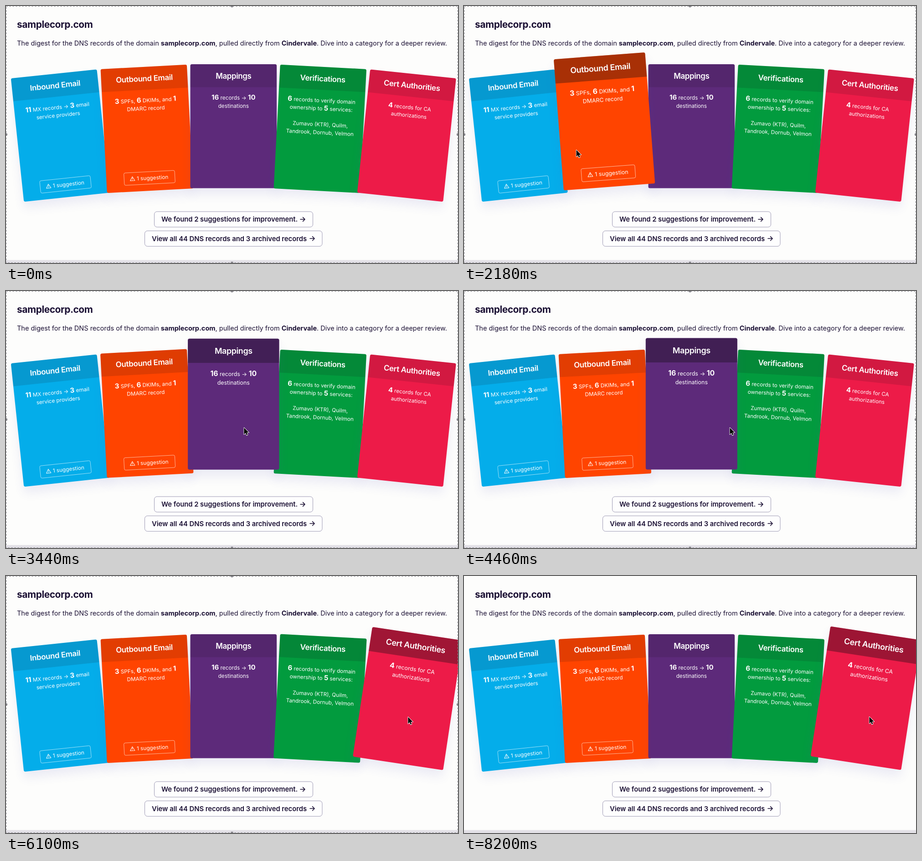
These frames come from a looping animation (992 by 565 pixels, 8220 ms). An HTML page:

```html
<!DOCTYPE html>
<html lang="en">
<head>
<meta charset="utf-8">
<title>DNS digest</title>
<style>
  html, body { margin: 0; width: 100%; height: 100%; overflow: hidden; background: #fdfdfc; }
  svg { display: block; width: 100vw; height: 100vh; font-family: Inter, "Open Sans", sans-serif; fill: #1b1034; }
  .domain { font-size: 20.9px; font-weight: 700; letter-spacing: -.02em; }
  .intro { font-size: 14.53px; }
  .intro tspan { font-weight: 700; }
  .button rect { fill: #fefefe; stroke: #9d99b4; }
  .button text { font-size: 14.78px; font-weight: 600; }
  .button path { fill: none; stroke: #1b1034; stroke-width: 1.6; stroke-linecap: round; stroke-linejoin: round; }
  .card text { fill: #fff; font-size: 11.75px; text-anchor: middle; }
  .card .name { font-size: 16.9px; font-weight: 600; letter-spacing: -.02em; }
  .card tspan { font-size: 15px; font-weight: 700; }
  .card .hint text { text-anchor: start; }
  .hint rect { fill: none; stroke: #fff; stroke-opacity: .65; stroke-width: .9; }
  .hint path { fill: none; stroke: #fff; stroke-width: 1; stroke-linecap: round; stroke-linejoin: round; }
  .shadow { fill: #5050b4; opacity: .1; filter: url(#blur); }
  .frame rect { fill: none; stroke: #85848a; stroke-width: 2; stroke-dasharray: 4 3; }
  .frame circle { fill: #85848a; }
</style>
</head>
<body>
<svg viewBox="0 0 992 565" preserveAspectRatio="none">
  <defs>
    <filter id="blur" x="-30%" y="-30%" width="160%" height="160%"><feGaussianBlur stdDeviation="11"/></filter>
  </defs>
  <rect width="992" height="565" fill="#fdfdfc"/>
  <rect y="558.5" width="992" height="6.5" fill="#e3e1e7"/>
  <text class="domain" x="24" y="48">samplecorp.com</text>
  <text class="intro" x="24" y="87">The digest for the DNS records of the domain <tspan>samplecorp.com</tspan>, pulled directly from <tspan>Cindervale</tspan>. Dive into a category for a deeper review.</text>
  <g id="cards"></g>
  <g class="button">
    <rect x="325.5" y="452" width="348" height="34" rx="6"/>
    <text x="341" y="474.3">We found 2 suggestions for improvement.</text>
    <path d="M646 469h10m-4.4-4.4l4.4 4.4l-4.4 4.4"/>
  </g>
  <g class="button">
    <rect x="304.5" y="494.3" width="389.5" height="34" rx="6"/>
    <text x="320" y="516.5">View all 44 DNS records and 3 archived records</text>
    <path d="M667 511.3h10m-4.4-4.4l4.4 4.4l-4.4 4.4"/>
  </g>
  <g class="frame" id="frame">
    <rect width="992" height="565"/>
    <circle cx="496" cy="0" r="3"/><circle cx="496" cy="565" r="3"/>
    <circle cx="0" cy="282.5" r="3"/><circle cx="992" cy="282.5" r="3"/>
  </g>
  <path id="cursor" d="M.6 .6V15.2L4 12.1L6.1 17.1L8.5 16.1L6.4 11.2H11Z" fill="#000" stroke="#fff" stroke-width="1.7" stroke-linejoin="round" paint-order="stroke"/>
</svg>
<script>
const LOOP = 8220, FADE = 300;
const W = 189.6, H = 272.6, HEAD = 50.5;
const SVG = 'http://www.w3.org/2000/svg';
const get = id => document.getElementById(id);

// Asterisks mark the large bold counts.
const CARDS = [
  { name: 'Inbound Email', color: '#04adea', y: 284.8, hint: true,
    lines: ['*11* MX records → *3* email', 'service providers'] },
  { name: 'Outbound Email', color: '#ff4400', y: 270, hint: true,
    lines: ['*3* SPFs, *6* DKIMs, and *1*', 'DMARC record'] },
  { name: 'Mappings', color: '#5d2a7a', y: 264.3,
    lines: ['*16* records → *10*', 'destinations'] },
  { name: 'Verifications', color: '#029b3e', y: 270,
    lines: ['*6* records to verify domain', 'ownership to *5* services:', '',
            'Zumavo (KTR), Quilm,', 'Tandrook, Dornub, Velmon'] },
  { name: 'Cert Authorities', color: '#ed1b48', y: 284.8,
    lines: ['*4* records for CA', 'authorizations'] }
];

// Card under the pointer: [card, enter, leave]
const HOVERS = [[1, 1030, 3155], [2, 3155, 4450], [3, 4450, 5848], [4, 5848, Infinity]];

// Pointer path: [time, x, y]
const PATH = [
  [500, 196, 570], [1030, 227, 404], [1240, 235, 346], [2105, 246, 316], [2950, 264, 314],
  [3155, 415, 306], [3365, 522, 300], [4250, 528, 300], [4450, 590, 300], [4700, 682, 300],
  [5020, 690, 300], [5600, 695, 302], [5848, 782, 306], [6058, 882, 309.5], [8158, 889, 309]
];

const hintMarkup = `<g class="hint" transform="translate(0 108)">
  <rect x="-55.8" y="-13.6" width="111.6" height="27.2" rx="3"/>
  <path d="M-37.5 -4.6L-32.4 4.2H-42.6ZM-37.5 -1.6V1M-37.5 2.6V2.7"/>
  <text x="-28" y="4.2">1 suggestion</text></g>`;

function cardMarkup({ name, color, lines, hint }) {
  const x = -W / 2, y = -H / 2;
  const text = lines.map((line, i) =>
    `<text y="${y + 78 + i * 17.6}">${line.replace(/\*(\d+)\*/g, '<tspan>$1</tspan>')}</text>`).join('');
  return `<rect class="shadow" x="${x}" y="${y + 14}" width="${W}" height="${H}"/>
    <rect x="${x}" y="${y}" width="${W}" height="${H}" rx="3.5" fill="${color}"/>
    <path class="head" fill="#100c12" d="M${x} ${y + HEAD}v${3.5 - HEAD}q0 -3.5 3.5 -3.5h${W - 7}q3.5 0 3.5 3.5v${HEAD - 3.5}z"/>
    <text class="name" y="${y + 31.7}">${name}</text>${text}${hint ? hintMarkup : ''}`;
}

const layer = get('cards');
const nodes = CARDS.map(card => {
  const g = document.createElementNS(SVG, 'g');
  g.setAttribute('class', 'card');
  g.innerHTML = cardMarkup(card);
  layer.append(g);
  return g;
});

// Playback rests for 100 ms every 420 ms, then moves in 20 ms steps.
function playTime(t) {
  const cycle = Math.floor((t + 20) / 420), part = (t + 20) % 420;
  const step = part < 100 ? 0 : 1 + Math.floor((part - 100) / 20);
  return cycle * 420 + step * 420 / 17 - 20;
}

function ease(x) {
  x = Math.min(1, Math.max(0, x));
  return 1 - (1 - x ** 1.3) ** 3;
}

function lift(i, t) {
  return HOVERS.reduce((sum, [card, enter, leave]) =>
    card === i ? sum + ease((t - enter) / FADE) - ease((t - leave) / FADE) : sum, 0);
}

function pointerAt(t) {
  const i = PATH.findIndex(p => p[0] > t);
  if (i <= 0) return PATH[i < 0 ? PATH.length - 1 : 0].slice(1);
  const a = PATH[i - 1], b = PATH[i], k = (t - a[0]) / (b[0] - a[0]);
  return [a[1] + (b[1] - a[1]) * k, a[2] + (b[2] - a[2]) * k];
}

let raised = -1;
function raise(i) {
  if (i === raised) return;
  raised = i;
  layer.append(...nodes);
  if (i >= 0) layer.append(nodes[i]);
}

function draw(now) {
  const t = playTime(now % LOOP);
  const hover = HOVERS.find(([, enter, leave]) => t >= enter && t < leave);
  raise(hover ? hover[0] : -1);
  nodes.forEach((node, i) => {
    const p = lift(i, t), x = 499.3 + (i - 2) * 190, angle = (i - 2) * 3 * (1 + .45 * p);
    node.setAttribute('transform',
      `translate(${x} ${CARDS[i].y}) rotate(${angle}) translate(0 ${-16.4 * p}) scale(${1 + .06 * p})`);
    node.querySelector('.head').style.opacity = .12 + .24 * p;
  });
  get('cursor').setAttribute('transform', `translate(${pointerAt(t)})`);
  get('frame').style.display = t < 8100 ? '' : 'none';
}

const start = performance.now();
function tick() {
  draw(performance.now() - start);
  requestAnimationFrame(tick);
}
tick();
</script>
</body>
</html>
```
